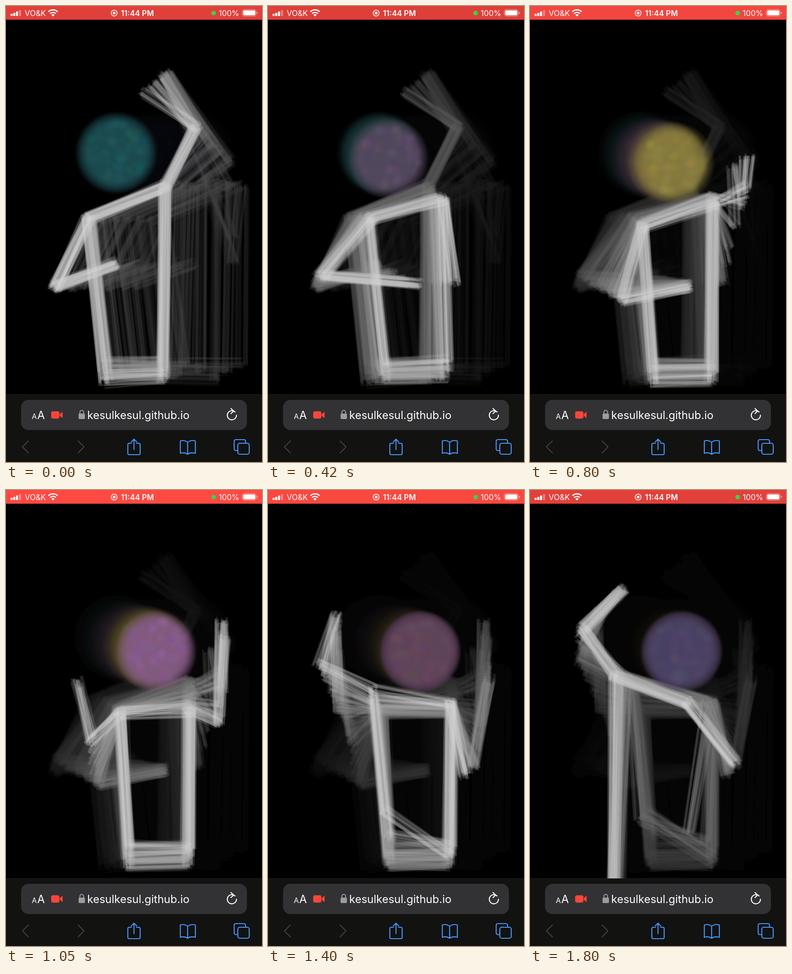
An HTML page with a canvas that plays this animation: 561 by 998 pixels, repeating every 1.83 s.

```html
<!DOCTYPE html>
<html lang="en">
<head>
<meta charset="utf-8">
<title>Skeleton trails</title>
<style>
html, body { margin: 0; width: 100%; height: 100%; overflow: hidden; background: #000; }
canvas, svg { position: absolute; left: 0; top: 0; display: block; }
text { font-family: Inter, Roboto, sans-serif; fill: #fff; }
</style>
</head>
<body>
<canvas id="stage" width="561" height="998"></canvas>
<svg width="561" height="998" viewBox="0 0 561 998">
  <rect id="status" width="561" height="30"/>
  <g fill="#fff">
    <rect x="10" y="17" width="4.5" height="5" rx="1"/>
    <rect x="16" y="15" width="4.5" height="7" rx="1"/>
    <rect x="22" y="12" width="4.5" height="10" rx="1"/>
    <rect x="28.5" y="9" width="4.5" height="13" rx="1" opacity=".35"/>
    <text x="41" y="21.5" font-size="17">VO&amp;K</text>
    <path d="M103 23l-3.6-3.7a5.2 5.2 0 0 1 7.2 0z"/>
    <g fill="none" stroke="#fff" stroke-width="2.6">
      <path d="M96.600 16.600a9 9 0 0 1 12.800 0M92.800 12.600a14.500 14.500 0 0 1 20.400 0"/>
      <circle cx="237" cy="15.500" r="6.500" stroke-width="1.600"/>
    </g>
    <circle cx="237" cy="15.500" r="3"/>
    <text x="252" y="21.500" font-size="16.700" font-weight="600">11:44 PM</text>
    <circle cx="455" cy="15.500" r="5" fill="#32d74b"/>
    <text x="466" y="21.500" font-size="17">100%</text>
    <rect x="517.500" y="7.500" width="31" height="15" rx="4.500" fill="none" stroke="#fff" stroke-opacity=".5"/>
    <rect x="519.500" y="9.500" width="27" height="11" rx="3"/>
    <path d="M550 12.500q2 .5 2 2.500t-2 2.500z" opacity=".6"/>
  </g>

  <rect y="850" width="561" height="148" fill="#121211"/>
  <rect y="850" width="561" height="1" fill="#25240f"/>
  <rect x="33" y="862" width="495" height="66" rx="16" fill="#323234"/>
  <text x="56.500" y="904" font-size="16">A</text>
  <text x="68.500" y="904" font-size="24">A</text>
  <g fill="#ff453a">
    <rect x="99" y="887" width="18" height="16" rx="4"/>
    <path d="M118 893l6-5v14l-6-5z"/>
  </g>
  <rect x="159" y="892" width="14" height="12" rx="2" fill="#9b9ba0"/>
  <path d="M162 893v-4a4 4 0 0 1 8 0v4" fill="none" stroke="#9b9ba0" stroke-width="2"/>
  <text x="178" y="904" font-size="24">kesulkesul.github.io</text>
  <g fill="none" stroke-width="2.200" stroke-linecap="round" stroke-linejoin="round">
    <path d="M502 888.500a10 10 0 1 0 3 7M493 881l6 5.500-6 5.500" stroke="#fff"/>
    <path d="M49 952l-13 13 13 13M158 952l13 13-13 13" stroke="#404043"/>
    <g stroke="#4a94f8">
      <path d="M275 957h-5q-3 0-3 3v19q0 3 3 3h21q3 0 3-3v-19q0-3-3-3h-5M280.500 971v-23M274.500 954l6-6 6 6"/>
      <path d="M398 955q-7-6-16-3v27q9-3 16 2 7-5 17-2v-27q-10-3-17 3zv26"/>
      <path d="M508 973h-4q-4 0-4-4v-16q0-4 4-4h17q4 0 4 4v4"/>
      <rect x="508" y="957" width="25" height="24" rx="4"/>
    </g>
  </g>
</svg>
<script>
const LOOP = 1830, STEP = 40, FIRST = -14, LAST = 45;
const ctx = document.getElementById('stage').getContext('2d');
const statusBar = document.getElementById('status');

// Where the arms dwell: [time, x, y]
const elbowL = [[0, 108, 612], [300, 115, 590], [800, 203, 640], [1040, 186, 548],
  [1180, 158, 482], [1400, 114, 380], [1720, 115, 303]];
const wristL = [[0, 238, 565], [400, 333, 612], [800, 350, 614], [1000, 158, 430],
  [1180, 150, 325], [1400, 147, 270], [1720, 205, 217]];
const elbowR = [[-560, 495, 560], [-440, 490, 340], [-200, 415, 265], [40, 413, 265], [80, 362, 600],
  [520, 418, 605], [800, 472, 397], [1000, 465, 505], [1200, 451, 602], [1400, 427, 625], [1720, 447, 595]];
const wristR = [[-160, 350, 150], [40, 297, 188], [680, 440, 355], [800, 477, 330],
  [960, 474, 288], [1200, 484, 420]];
const headColor = [[-300, 15, 20, 35], [0, 34, 98, 102], [160, 32, 84, 78], [400, 108, 82, 114],
  [800, 160, 146, 66], [1040, 148, 94, 168], [1400, 106, 76, 94], [1800, 84, 76, 116]];

const clamp = u => Math.min(1, Math.max(0, u));
const smooth = u => u * u * (3 - 2 * u);
const ramp = (t, from, to) => smooth(clamp((t - from) / (to - from)));

function along(keys, t) {
  const next = keys.findIndex(key => key[0] > t);
  const b = keys[next < 0 ? keys.length - 1 : next];
  const a = keys[next < 0 ? keys.length - 1 : Math.max(0, next - 1)];
  const u = a === b ? 0 : ramp(t, a[0], b[0]);
  return a.slice(1).map((v, i) => v + (b[i + 1] - v) * u);
}

// The body darts in from the right, leans over, then turns away to the left.
function poseAt(t) {
  const entry = 170 * clamp((-320 - t) / 240);
  const bounce = 18 * Math.cos(Math.PI * t / 80);
  const crouch = ramp(t, 1340, 1400), turn = ramp(t, 1500, 1580);
  const enter = ([x, y]) => [x + entry, y];
  return {
    head: enter([242 + 92 * ramp(t, 0, 1100), 322 + 30 * ramp(t, 0, 1100)]),
    shoulderL: enter([180 + 72 * Math.sin(Math.PI * clamp(t / 1850)),
      465 + 20 * ramp(t, 400, 900) - 77 * ramp(t, 1150, 1600)]),
    shoulderR: enter([350 + 50 * ramp(t, 0, 600) - 52 * ramp(t, 1560, 1720),
      392 + 30 * ramp(t, 0, 300) + 62 * ramp(t, 700, 1050) - 18 * ramp(t, 1150, 1400)]),
    hipL: enter([219 + 48 * ramp(t, 0, 500) - 12 * crouch - 71 * turn,
      801 + bounce - 95 * crouch + 184 * turn]),
    hipR: enter([344 + 53 * ramp(t, 0, 400) - 54 * turn, 799 + bounce - 65 * turn]),
    elbowL: enter(along(elbowL, t)),
    wristL: enter(along(wristL, t)),
    elbowR: along(elbowR, t),
    wristR: along(wristR, t)
  };
}

function bonesAt(t) {
  const bones = [['shoulderL', 'shoulderR'], ['shoulderL', 'hipL'],
    ['shoulderL', 'elbowL'], ['shoulderR', 'elbowR']];
  if (t < 1620) bones.push(['shoulderR', 'hipR']);
  if (t < 1540) bones.push(['hipL', 'hipR']);
  if (t < 820 || t > 980) bones.push(['elbowL', 'wristL']);
  if (t < 60 || (t > 660 && t < 1260)) bones.push(['elbowR', 'wristR']);
  return bones;
}

function seeded(seed) {
  let s = (seed * 7919 + 104729) >>> 0;
  return () => {
    s = (s + 0x6D2B79F5) >>> 0;
    let r = Math.imul(s ^ (s >>> 15), s | 1);
    r ^= r + Math.imul(r ^ (r >>> 7), r | 61);
    return ((r ^ (r >>> 14)) >>> 0) / 4294967296;
  };
}

function softDisc(x, y, radius, rgb, alpha, core) {
  const fill = ctx.createRadialGradient(x, y, radius * core, x, y, radius);
  const color = rgb.map(Math.round).join();
  fill.addColorStop(0, `rgba(${color},${alpha})`);
  fill.addColorStop(1, `rgba(${color},0)`);
  ctx.fillStyle = fill;
  ctx.fillRect(x - radius, y - radius, radius * 2, radius * 2);
}

function drawHead([x, y], rgb, random) {
  softDisc(x, y, 90, rgb, 0.34, 0.7);
  for (let i = 0; i < 30; i++) {
    const angle = random() * Math.PI * 2, r = 68 * Math.sqrt(random());
    const tint = rgb.map(v => Math.max(0, v + (random() - 0.5) * 60));
    softDisc(x + r * Math.cos(angle), y + r * Math.sin(angle), 13, tint, 0.18, 0.2);
  }
}

// A bone is a bundle of translucent streaks.
function drawBone([x1, y1], [x2, y2], spread) {
  const length = Math.hypot(x2 - x1, y2 - y1) || 1;
  const ux = (x2 - x1) / length, uy = (y2 - y1) / length;
  ctx.strokeStyle = 'rgba(210,208,208,.16)';
  for (let i = 0; i < 12; i++) {
    const side = spread(24), a = side + spread(4), b = side + spread(4);
    const start = spread(12) - 3, end = spread(12) + 3;
    ctx.lineWidth = 5.5 + spread(5);
    ctx.beginPath();
    ctx.moveTo(x1 + ux * start - uy * a, y1 + uy * start + ux * a);
    ctx.lineTo(x2 + ux * end - uy * b, y2 + uy * end + ux * b);
    ctx.stroke();
  }
}

function paintStep(step) {
  const t = step * STEP, random = seeded(step + 100);
  const spread = range => (random() - 0.5) * range;
  const pose = poseAt(t);
  for (const name in pose) pose[name] = pose[name].map(v => v + spread(9));
  ctx.fillStyle = 'rgba(0,0,0,.09)';
  ctx.fillRect(0, 0, 561, 998);
  drawHead(pose.head, along(headColor, t), random);
  for (const [from, to] of bonesAt(t)) drawBone(pose[from], pose[to], spread);
}

let painted = Infinity;

// Trails are rebuilt from the first step whenever time wraps.
function render(t) {
  const step = Math.min(LAST, Math.floor((t + 10) / STEP));
  if (step < painted) {
    ctx.fillStyle = '#000';
    ctx.fillRect(0, 0, 561, 998);
    painted = FIRST - 1;
  }
  while (painted < step) paintStep(++painted);
  const glow = -Math.cos((t - 240) / LOOP * Math.PI * 2);
  statusBar.setAttribute('fill', `rgb(${237 + 18 * glow},${68 + 6 * glow},${61 + 5 * glow})`);
}

function tick() {
  render(performance.now() % LOOP);
  requestAnimationFrame(tick);
}
tick();
</script>
</body>
</html>
```
